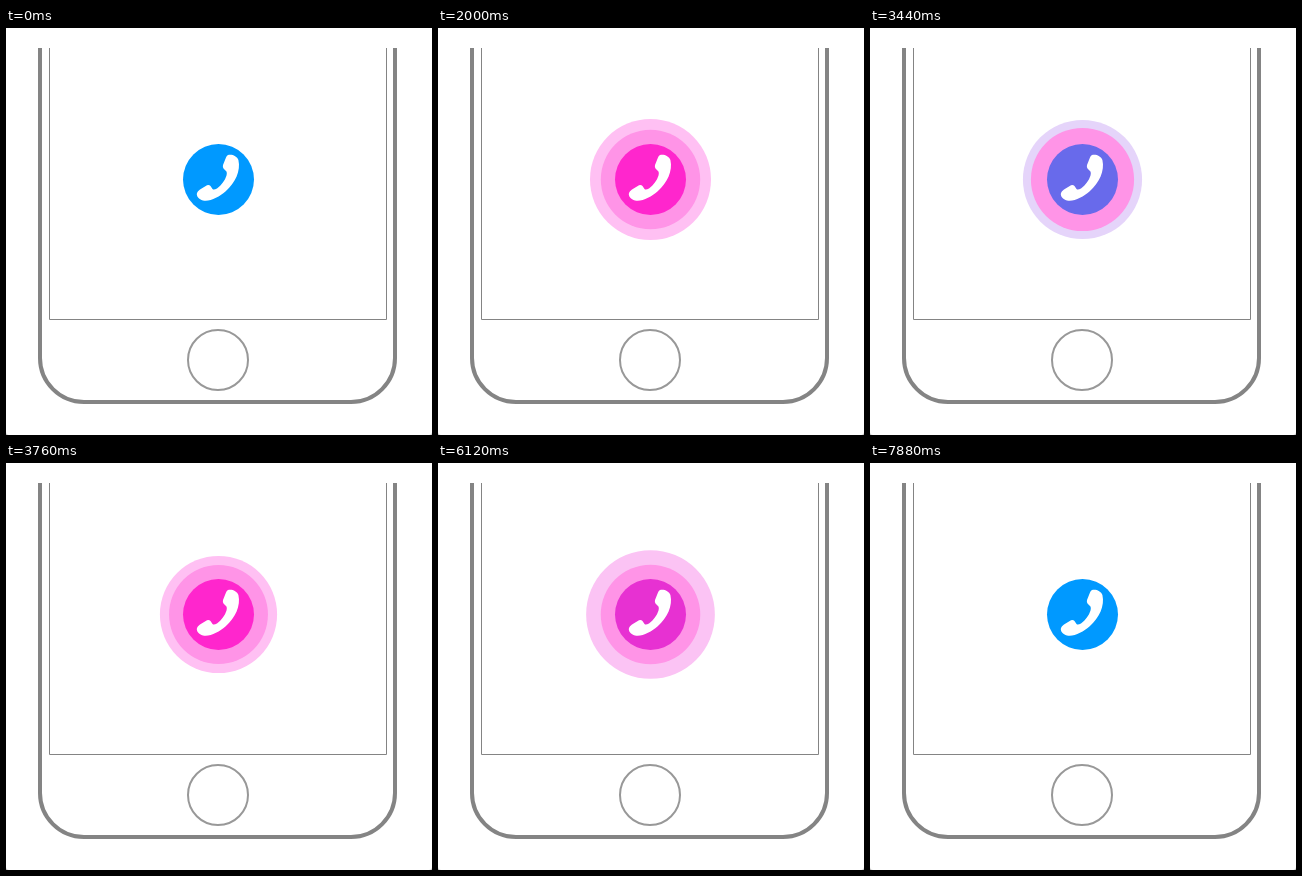
Animation, 426 px wide and 407 px high, one loop 7.96 s. Source, as an HTML page with a canvas:

```html
<!DOCTYPE html>
<html lang="en">
<head>
<meta charset="utf-8">
<title>Call button pulse</title>
<style>
html, body { margin: 0; width: 100%; height: 100%; overflow: hidden; background: #fff; }
canvas { display: block; width: 426px; height: 407px; }
</style>
</head>
<body>
<canvas id="stage" width="426" height="407"></canvas>
<script>
const ctx = document.getElementById('stage').getContext('2d');
const LOOP = 7960, STEP = 40, FADE = 320;
const CX = 212.5, CY = 151.5, DISC = 35.5;

// Each press switches the button on, then off.
const presses = [[990, 2220], [3310, 4790], [5830, 7110]];

const BLUE = [0, 153, 255], MAGENTA = [255, 38, 205];
const outer = { rest: 60.5, peak: 217, on: [255, 192, 243], off: [212, 225, 255] };
const inner = { rest: 49.7, peak: 180, on: [255, 148, 231], off: [115, 215, 240] };

const handset = new Path2D(
  'M222 127C226 126 231 128 232.4 132C235 143 229 155 220 163C213 169 204 174 197 172.5' +
  'C193 171.5 190 168 191 165Q191.5 163 194 161.5L201 157.2Q203 156.3 204.5 158L206.5 161' +
  'C207.5 162 209 161.5 211 160.5C215.5 157 219 152.5 220.5 147.5C221 145.5 221 144 220 143' +
  'L217.5 140.5Q216.5 139 217 137L220 129.5Q220.6 127.5 222 127Z');

const clamp = v => Math.min(1, Math.max(0, v));
const mix = (a, b, k) => `rgb(${a.map((v, i) => Math.round(v + (b[i] - v) * k))})`;

// Underdamped step response whose first overshoot falls at `peak` ms.
function spring(t, peak) {
  const x = Math.PI * t / peak, damping = 0.4045;
  return 1 - Math.exp(-damping * x) * (Math.cos(x) + damping * Math.sin(x));
}

function settle(t) {
  const x = 0.0244 * t;
  return 1 - (1 + x) * Math.exp(-x);
}

function disc(r, color) {
  ctx.fillStyle = color;
  ctx.beginPath();
  ctx.arc(CX, CY, r, 0, Math.PI * 2);
  ctx.fill();
}

function drawPhone() {
  ctx.fillStyle = '#fff';
  ctx.fillRect(0, 0, 426, 407);

  ctx.strokeStyle = '#848484';
  ctx.lineWidth = 4;
  ctx.beginPath();
  ctx.moveTo(34, 20);
  ctx.lineTo(34, 330);
  ctx.arcTo(34, 374, 78, 374, 44);
  ctx.lineTo(345, 374);
  ctx.arcTo(389, 374, 389, 330, 44);
  ctx.lineTo(389, 20);
  ctx.stroke();

  ctx.lineWidth = 1;
  ctx.beginPath();
  ctx.moveTo(43.5, 20);
  ctx.lineTo(43.5, 291.5);
  ctx.lineTo(380.5, 291.5);
  ctx.lineTo(380.5, 20);
  ctx.stroke();

  ctx.strokeStyle = '#989898';
  ctx.lineWidth = 2;
  ctx.beginPath();
  ctx.arc(212, 332, 30, 0, Math.PI * 2);
  ctx.stroke();

  ctx.fillStyle = '#bbb';
  for (const [x, dir] of [[0, 1], [426, -1]]) {
    ctx.beginPath();
    ctx.moveTo(x, 404);
    ctx.quadraticCurveTo(x, 407, x + 3 * dir, 407);
    ctx.lineTo(x, 407);
    ctx.fill();
  }
}

function drawButton(time) {
  const press = presses.filter(p => time >= p[0]).pop();
  if (!press) {
    disc(DISC, mix(BLUE, MAGENTA, 0));
  } else {
    const [on, off] = press;
    const rising = time < off;
    const tint = rising ? clamp((time - on) / FADE) : 1 - clamp((time - off) / FADE);
    for (const ring of [outer, inner]) {
      const grow = rising ? spring(time - on, ring.peak) : 1 - settle(time - off);
      const radius = DISC + (ring.rest - DISC) * grow;
      const ringTint = rising && ring === inner ? 1 : tint;
      if (radius > DISC + 0.25) disc(radius, mix(ring.off, ring.on, ringTint));
    }
    disc(DISC, mix(BLUE, MAGENTA, tint));
  }
  ctx.fillStyle = '#fff';
  ctx.fill(handset);
}

let start;
function frame(now) {
  start ??= now;
  const time = (now - start) % LOOP;
  drawPhone();
  drawButton(Math.floor(time / STEP) * STEP);
  requestAnimationFrame(frame);
}
requestAnimationFrame(frame);
</script>
</body>
</html>
```
